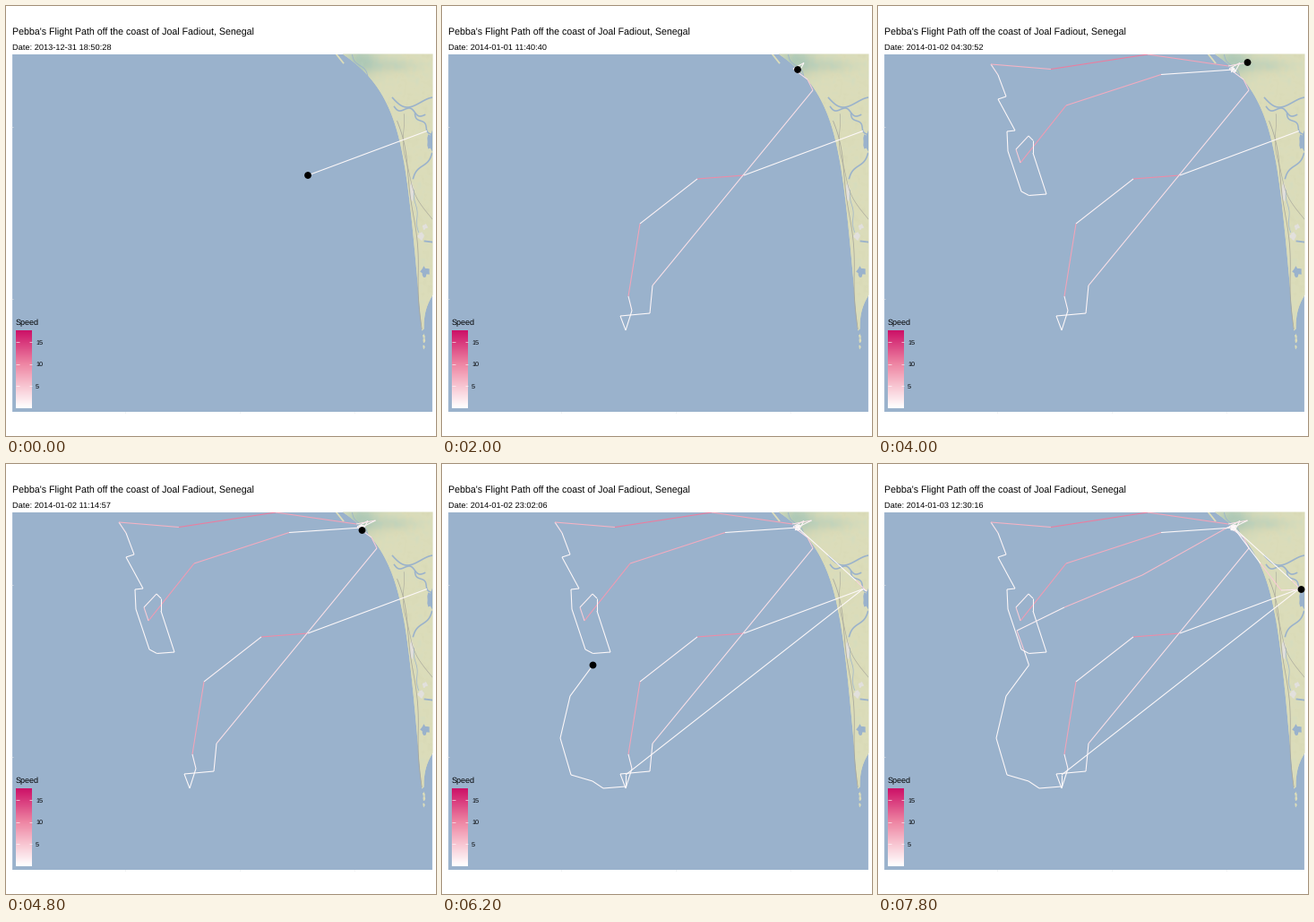
Write a matplotlib script that moves like this. It is 480 px wide and 480 px high and loops after 8000 ms.

```python
import numpy as np
import matplotlib.pyplot as plt
from matplotlib.animation import FuncAnimation
from matplotlib.collections import LineCollection
from matplotlib.colors import LinearSegmentedColormap, to_rgb
from matplotlib.patches import Circle, Polygon, Rectangle

plt.rcParams.update({"font.family": "Liberation Sans", "text.hinting": "none"})

SIZE, FRAMES, STEP_MS = 480, 40, 200
START = np.datetime64("2013-12-31T18:50:28")
STEP_S = 6061.235          # tracked seconds per frame
SEA, SAND, MARSH = "#9ab2cc", "#dcddba", "#afc9b6"
TOWN, ROAD, GRID = "#e2e0dc", "#a9a89c", "#d8dde3"
MAX_SPEED = 17.6
HOME, COLONY = (397, 71), (470, 139.5)
speed_map = LinearSegmentedColormap.from_list(
    "speed", [(0, "#ffffff"), (0.28, "#f8c6d2"), (0.57, "#ee85a3"), (1, "#cd1268")])

fig = plt.figure(figsize=(SIZE / 72, SIZE / 72), dpi=72, facecolor="white")
ax = fig.add_axes([0, 0, 1, 1])
ax.axis("off")
panel = ax.add_patch(Rectangle((6.6, 53.5), 468.8, 399, fc=SEA, ec="none",
                               zorder=0, snap=False))


def shore(y):
    """West coast: a nearly straight beach bending away to the north-west."""
    return 452.5 + 0.085 * (y - 230) - 61 * np.exp(-(y - 54) / 44)


def area(x, y, color, z=2):
    patch = ax.add_patch(Polygon(np.c_[x, y], fc=color, ec="none", zorder=z))
    patch.set_clip_path(panel)
    return patch


def stroke(x, y, color, width):
    line, = ax.plot(x, y, color=color, lw=width, zorder=2.5)
    line.set_clip_path(panel)


def blob(x, y, w, h, color, rng):
    a = np.linspace(0, 2 * np.pi, 14, endpoint=False)
    r = rng.uniform(0.65, 1.35, a.size) / 2
    area(x + w * r * np.cos(a), y + h * r * np.sin(a), color)


def creek(a, b, width, sway=2.0, waves=1.5):
    """A winding channel from a to b."""
    (x0, y0), (x1, y1) = a, b
    u = np.linspace(0, 1, 40)
    off = sway * np.sin(2 * np.pi * waves * u)
    length = np.hypot(x1 - x0, y1 - y0)
    stroke(x0 + (x1 - x0) * u - off * (y1 - y0) / length,
           y0 + (y1 - y0) * u + off * (x1 - x0) / length, SEA, width)


def draw_relief(land, rng):
    gx, gy = np.meshgrid(np.arange(370, 477), np.arange(53, 365))
    green = np.exp(-((gx - 395) / 20) ** 2 - ((gy - 62) / 17) ** 2)
    green += 0.45 * np.exp(-((gx - 432) / 26) ** 2 - ((gy - 66) / 9) ** 2)
    bumps = np.mean([np.sin(gx * p + gy * q + r) for p, q, r in
                     rng.normal(0, [0.4, 0.4, 3], (20, 3))], axis=0)
    mix = np.clip(green + bumps * 0.4, 0, 1)[..., None]
    tone = np.array(to_rgb(SAND)) * (1 - mix) + np.array(to_rgb(MARSH)) * mix
    img = ax.imshow(np.clip(tone + bumps[..., None] * 0.03, 0, 1), zorder=1.5,
                    extent=(369.5, 476.5, 364.5, 52.5), interpolation="nearest")
    img.set_clip_path(land)


def draw_land():
    rng = np.random.default_rng(14)
    west = np.linspace(53, 362, 120)
    east = np.linspace(360, 322, 20)
    land = area(np.r_[shore(west), 466 + 10 * ((360 - east) / 38) ** 2.5, 476],
                np.r_[west, east, 53], SAND, 1)
    draw_relief(land, rng)

    # sand spit and island off the tip
    spit = np.linspace(53, 63, 8)
    stroke(368 + 0.8 * (spit - 53), spit, SAND, 1.8)
    for y in (368, 373, 380):
        blob(466, y, 2.5, 5, SAND, rng)

    # delta channels and lagoons
    creek((386, 54), (412, 90), 0.8)
    creek((431, 102), (475, 109), 1.6, 8, 0.7)
    creek((433, 112), (467, 121), 1.6, 3)
    creek((456, 120), (475, 143), 1.5)
    creek((475, 164), (454, 192), 1.6, -2, 1)
    creek((455, 205), (460, 252), 0.7, 1)
    creek((467, 262), (475, 263), 1.8, 0)
    blob(474, 151, 10, 20, SEA, rng)
    blob(467, 296, 9, 11, SEA, rng)

    # towns, and a road that keeps just inland of the beach
    blob(453, 207, 5, 22, TOWN, rng)
    blob(463, 256, 7, 9, TOWN, rng)
    blob(467, 246, 5, 6, TOWN, rng)
    y = np.linspace(128, 360, 80)
    inland = np.clip(362 - y, 0, 120) / 40
    stroke(shore(y) + inland + 1.5 * np.sin(y / 19), y, ROAD, 0.8)
    y = np.linspace(120, 238, 40)
    stroke(443 + 32 * ((y - 120) / 118) ** 3 + np.sin(y / 9), y, ROAD, 0.6)


def draw_labels():
    ax.text(6.5, 32.5, "Pebba's Flight Path off the coast of Joal Fadiout, Senegal",
            size=10.66)
    ax.text(10.5, 356, "Speed", size=9)
    ax.imshow(np.linspace(1, 0, 87)[:, None], cmap=speed_map, aspect="auto",
              extent=(10.5, 28.5, 448.5, 361.5), zorder=6)
    for v in (5, 10, 15):
        y = 448.5 - v * 4.91
        ax.hlines([y, y], [10.5, 25], [14, 28.5], color="white", lw=0.6, zorder=7)
        ax.text(32.5, y + 2.3, str(v), size=7.3)
    # ends of the graticule peeking out of the map
    ax.hlines([134, 326], 5.8, 7, color=GRID, lw=0.8, zorder=1)
    ax.vlines([132, 260, 388], 452, 453.2, color=GRID, lw=0.8, zorder=1)


# track rows: time in frames, x, y, speed
track = [(-0.5, *COLONY, 0.6)]
wander = np.random.default_rng(5)


def leg(end, points, *bursts):
    """Evenly timed fixes; each burst (place, top, spread) is a fast stretch."""
    k = np.arange(len(points))
    pace = 0.6 + sum(top * np.exp(-((k - at) / spread) ** 2)
                     for at, top, spread in bursts) + 0 * k
    times = np.linspace(track[-1][0], end, len(k) + 1)[1:]
    track.extend((t, *p, v) for t, p, v in zip(times, points, pace))


def roost(end, last=HOME, spread=3):
    n = round((end - track[-1][0]) * 1.5)
    leg(end, [*(HOME + wander.uniform(-spread, spread, (n, 2))), last])


leg(0, [(337, 189)], (0, 9, 1))
leg(5, [(285, 193), (221, 243), (208, 324), (212, 340), (205, 362), (199, 346),
        (232, 343), (235, 312), (414, 94), (408, 82), (392, 70), (404, 63.5)],
    (1, 7, 0.6), (8, 4, 1.2))
roost(10)
leg(14, [(316, 76.5), (210, 111), (159, 175), (154, 160), (168, 145), (173, 150),
         (173, 164), (188, 210), (168.5, 211.5)], (0.7, 8, 1.5))
leg(20, [(160, 207), (145, 162), (144, 140), (153, 139), (134, 104), (143, 101),
         (134, 77), (126, 65), (193, 70.5), (301, 54), (391, 67), (412.5, 63)],
    (8.1, 10, 1.5))
roost(24, (397.5, 74))
roost(25.7)
leg(27.5, [(462, 130), (474, 142), COLONY], (0, 3, 0.6))
leg(31, [(205, 347), (205, 360), (180, 362), (168, 354), (144, 347), (132, 306),
         (143, 259), (168.5, 224.5)])
leg(34, [(163, 208), (155, 186), (208, 160), (295, 124), (388, 72)],
    (0, 4, 0.6), (2.5, 7, 0.9))
roost(37.6, spread=5)
leg(39, [(427, 111), (450, 141), (472.5, 140)], (0, 4, 1))

track = np.array(track)
when, pos, speed = track[:, 0], track[:, 1:3] - 0.5, track[:, 3]

draw_land()
draw_labels()
route = ax.add_collection(LineCollection([], linewidths=1.07, zorder=4))
route.set_clip_path(panel)
bird = ax.add_patch(Circle((0, 0), 3.9, fc="black", ec="none", zorder=5))
stamp = ax.text(6.5, 48, "", size=9.29)
ax.set(xlim=(-0.5, SIZE - 0.5), ylim=(SIZE - 0.5, -0.5), aspect="auto")


def draw(i):
    k = np.searchsorted(when, i + 1e-6)
    here = [np.interp(i, when, axis) for axis in pos.T]
    line = np.vstack([pos[:k], here])
    route.set_segments(np.stack([line[:-1], line[1:]], axis=1))
    route.set_color(speed_map(speed[:k] / MAX_SPEED))
    bird.center = here
    now = START + np.timedelta64(int(i * STEP_S), "s")
    stamp.set_text("Date: " + str(now).replace("T", " "))
    return route, bird, stamp


anim = FuncAnimation(fig, draw, frames=FRAMES, interval=STEP_MS, repeat=True,
                     repeat_delay=0, blit=False)
plt.show()
```
